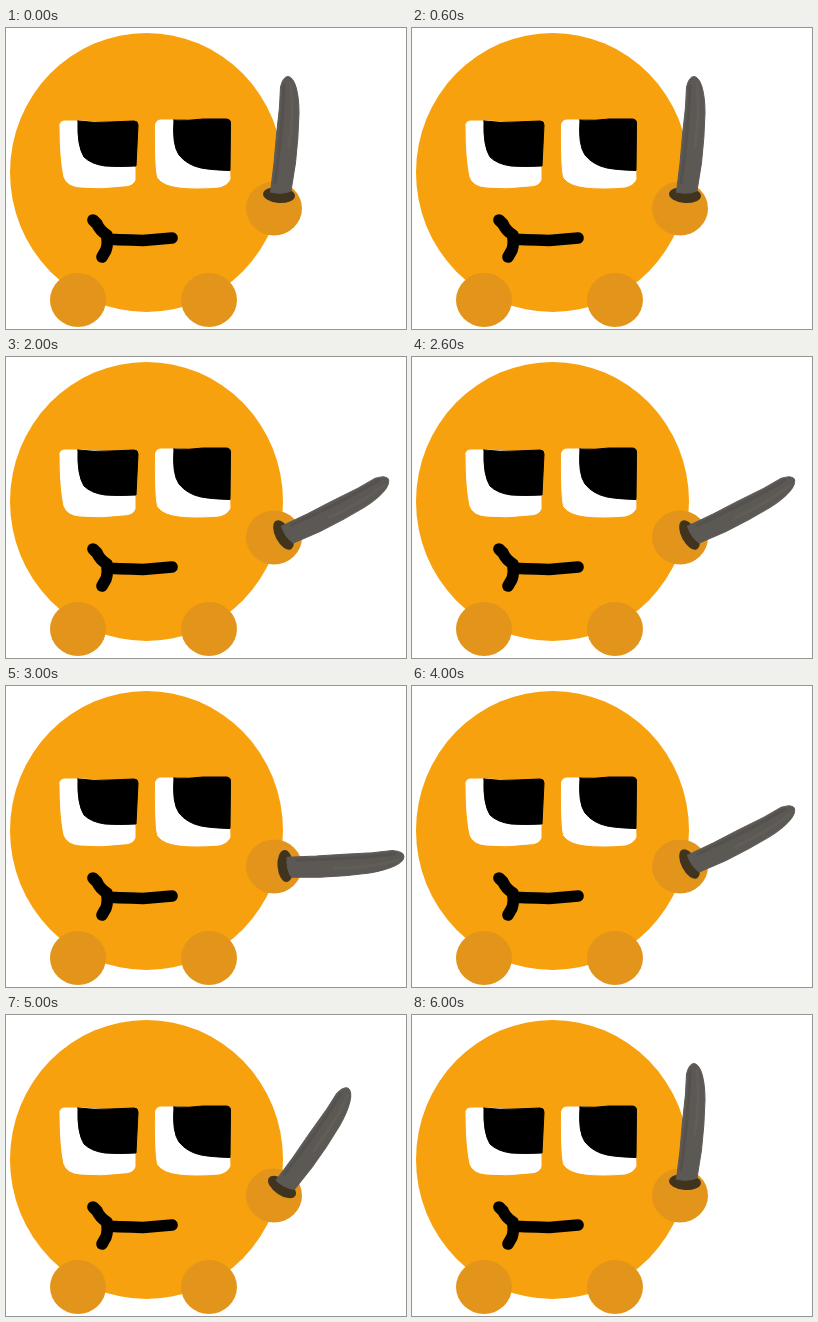
An HTML page with a canvas that plays this animation: 400 by 301 pixels, repeating every 7 s.

```html
<!DOCTYPE html>
<html lang="en">
<head>
<meta charset="utf-8">
<title>Knife swing</title>
<style>
  html, body { margin: 0; width: 100%; height: 100%; overflow: hidden; background: #fff; }
  canvas { display: block; }
</style>
</head>
<body>
<canvas id="stage" width="400" height="301"></canvas>
<script>
const ctx = document.getElementById('stage').getContext('2d');

const SKIN = '#f7a10e';
const LIMB = '#e3951b';
const STEP = 1000;

// Guard position and blade turn in degrees
const POSES = [
  { x: 273, y: 167, turn: 0 },
  { x: 276, y: 172, turn: 29.5 },
  { x: 277.5, y: 178, turn: 57.5 },
  { x: 279.5, y: 180, turn: 81 }
];
const SWING = [0, 1, 2, 3, 2, 1, 0];

function oval(x, y, rx, ry, color, tilt = 0) {
  ctx.fillStyle = color;
  ctx.beginPath();
  ctx.ellipse(x, y, rx, ry, tilt, 0, Math.PI * 2);
  ctx.fill();
}

function line(path, color, width) {
  ctx.strokeStyle = color;
  ctx.lineWidth = width;
  ctx.lineCap = ctx.lineJoin = 'round';
  ctx.stroke(new Path2D(path));
}

// Filled outline with a thin rim that rounds its corners
function shape(path, color) {
  ctx.fillStyle = color;
  ctx.fill(new Path2D(path));
  line(path, color, 1);
}

function drawFace() {
  shape('M54 97Q54 93 59 93L75 93L129 96L129 152Q127 158 117 158Q95 161 74 159Q61 158 58 149Q54 131 54 97Z', '#fff');
  shape('M72 93Q88 95 104 94L128 93Q132 93 132 97L130 138Q112 139 99 138Q85 136 78 129Q71 118 72 93Z', '#000');
  shape('M149.5 97Q150 92 155 92L170 92L222 95L224 151Q222 157 213 159Q189 161 173 159Q157 157 152 150Q149 143 149.5 97Z', '#fff');
  shape('M168 92Q183 93 197 91L220 91Q225 91 224.5 96L224 142.5Q206 142 195 140Q181 137 173 127Q166 117 168 92Z', '#000');
  line('M87 192L91 196Q94 203 101 207Q102 216 100 222L96 229M101 211Q113 212 125 212L137 212.5L166 210', '#000', 11.7);
}

function drawKnife({ x, y, turn }) {
  ctx.save();
  ctx.translate(x, y);
  ctx.rotate(turn * Math.PI / 180);
  oval(0, 0, 16, 8, '#40341f', 0.08);
  shape('M-8.5 -3L-5 -32L-2.5 -60L0.5 -88L1.5 -108Q4 -118.5 9 -118.5Q14 -118 17 -108Q20 -98 20 -82Q19.5 -58 16.5 -32L12 -4Q2 0 -8.5 -3Z', '#5c5955');
  line('M5 -110Q4 -70 -4 -12', '#54514e', 3);
  line('M12 -112Q15 -82 10 -48', '#615e5a', 3);
  ctx.restore();
}

function draw(time) {
  ctx.fillStyle = '#fff';
  ctx.fillRect(0, 0, 400, 301);
  oval(140.5, 144.5, 136.5, 139.5, SKIN);
  oval(72, 272, 28, 27, LIMB);
  oval(203, 272, 28, 27, LIMB);
  oval(268, 180.5, 28, 27, LIMB);
  drawFace();
  drawKnife(POSES[SWING[Math.floor(time / STEP) % SWING.length]]);
}

let start;
function tick(now) {
  start ??= now;
  draw(now - start);
  requestAnimationFrame(tick);
}
draw(0);
requestAnimationFrame(tick);
</script>
</body>
</html>
```
